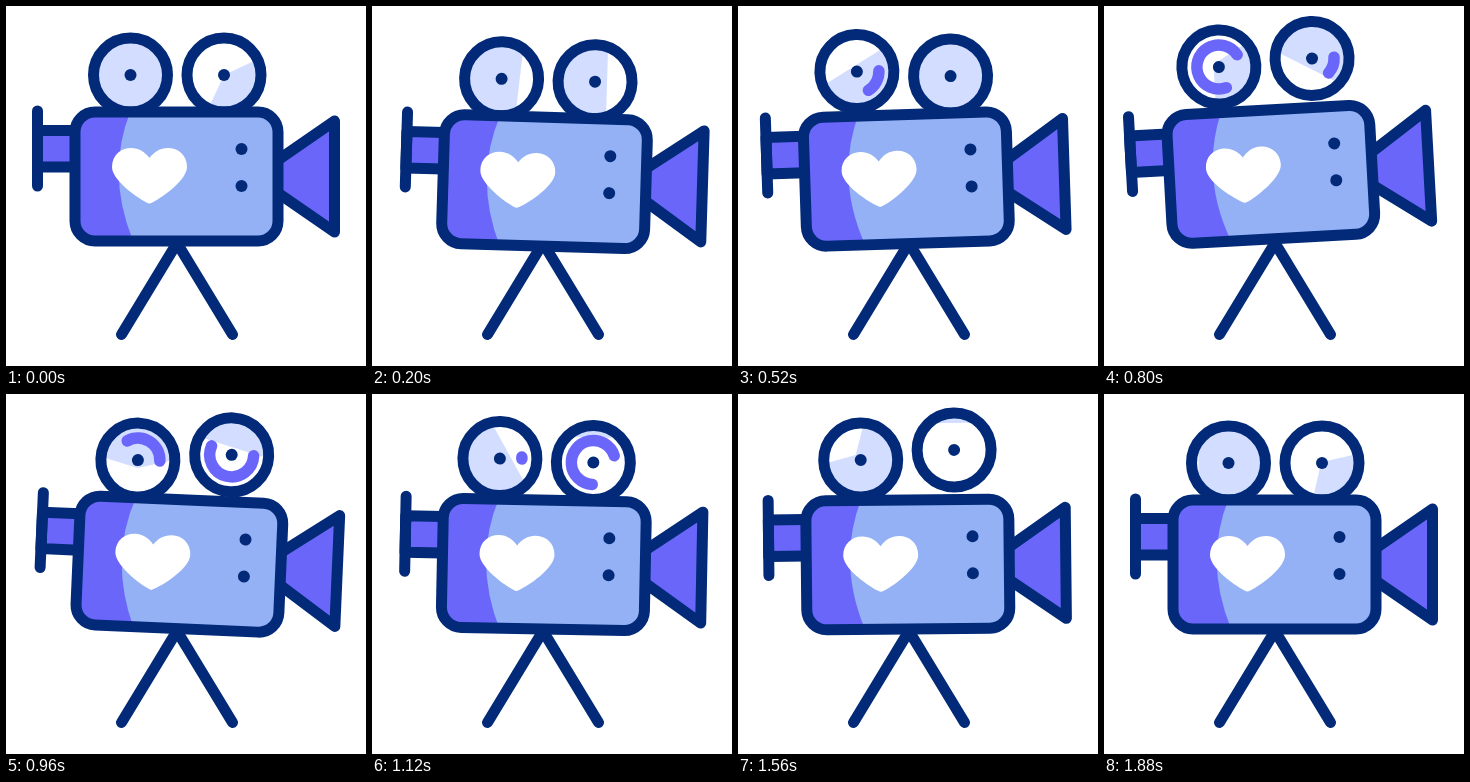
An HTML page for the animation above (2.68 s loop, 360 px wide and 360 px high).

```html
<!DOCTYPE html>
<html lang="en">
<head>
<meta charset="utf-8">
<title>Film camera</title>
<style>
  html, body { margin: 0; width: 100%; height: 100%; overflow: hidden; background: #fff; }
  svg { display: block; width: 100vw; height: 100vh; }
  .line { fill: none; stroke: #022a78; stroke-width: 11; stroke-linecap: round; stroke-linejoin: round; }
  .ink { fill: #022a78; }
  .violet { fill: #6b66fa; }
  .blue { fill: #93b1f4; }
  .pale { fill: #d2ddff; }
  .white { fill: #fff; }
  .arc { fill: none; stroke: #6b66fa; stroke-width: 11.5; stroke-linecap: round; }
</style>
</head>
<body>
<svg viewBox="0 0 360 360">
  <defs>
    <clipPath id="disc"><circle r="34"/></clipPath>
    <clipPath id="box"><rect x="69" y="106" width="203" height="129" rx="20"/></clipPath>
    <g id="hub"><circle class="line" r="37"/><circle class="ink" r="6"/></g>
  </defs>
  <path class="line" d="M115.5 328.5 171 237 226.5 328.5"/>
  <g id="camera">
    <g class="reel">
      <circle class="pale" r="36"/>
      <g clip-path="url(#disc)"><path class="white shine"/></g>
      <path class="arc"/><use href="#hub"/>
    </g>
    <g class="reel">
      <circle class="pale" r="36"/>
      <g clip-path="url(#disc)"><path class="white shine"/></g>
      <path class="arc"/><use href="#hub"/>
    </g>
    <g class="line">
      <path class="violet" d="M69 124.5H31.5V161H69"/>
      <path d="M31.5 105V180"/>
      <path class="violet" d="M272 154 328.5 115V226L272 187"/>
    </g>
    <g clip-path="url(#box)">
      <rect class="violet" x="69" y="106" width="203" height="129"/>
      <path class="blue" d="M124.5 105Q99.5 168 127.5 236H273V105Z"/>
    </g>
    <rect class="line" x="69" y="106" width="203" height="129" rx="20"/>
    <path class="white" d="M143.5 197.5C139 197 106 176 106 161C106 149 115 142 125 142C133 142 139 146 143.5 152C148 146 154 142 162 142C172 142 181 149 181 161C181 176 148 197 143.5 197.5Z"/>
    <circle class="ink" cx="235.5" cy="143" r="6"/>
    <circle class="ink" cx="235.5" cy="180" r="6"/>
  </g>
</svg>
<script>
const LOOP = 2680, MOVING = 1880, STEP = 40, BEAT = 335;

const camera = document.getElementById('camera');
const ease = x => { x = Math.min(1, Math.max(0, x)); return x * x * (3 - 2 * x); };
const linear = x => x;

// keys: [time, value, value...]
function sample(keys, t, curve = ease) {
  const n = keys.findIndex(k => k[0] > t);
  if (n < 0) return keys[keys.length - 1].slice(1);
  const a = keys[n - 1], b = keys[n];
  const p = curve((t - a[0]) / (b[0] - a[0]));
  return a.slice(1).map((v, i) => v + (b[i + 1] - v) * p);
}

const tilt = [[0, 0], [345, 2.8], [680, -5.9], [1002, 2.9], [1340, -3.4], [1640, 0]];
const drop = [[0, 0], [335, 8], [700, -2.8], [1040, 0]];

// shine keys: time, direction, apex distance, half angle
const reels = [
  { x: 124.5, hop: 335, spin: 390, shine: [
    [0, 0, 32, 90], [200, 5, 18, 90], [520, -120, 6, 90], [800, -150, 6, 120],
    [1120, -390, 10, 90], [1560, -495, 7, 60], [1880, -540, 30, 90]] },
  { x: 218, hop: 520, spin: 690, shine: [
    [0, -135, 0, 110], [200, 0, 12, 90], [520, 0, 32, 90], [800, 120, 10, 90],
    [1120, 90, -25, 90], [1560, 90, -27, 90], [1880, 225, 1, 122]] }
];
document.querySelectorAll('.reel').forEach((node, i) => {
  reels[i].node = node;
  reels[i].shinePath = node.querySelector('.shine');
  reels[i].arcPath = node.querySelector('.arc');
});

const polar = (r, deg) => [r * Math.cos(deg * Math.PI / 180), r * Math.sin(deg * Math.PI / 180)];

function wedge([dir, dist, half]) {
  const apex = polar(dist, dir);
  const ray = turn => polar(150, dir + turn).map((v, i) => v + apex[i]);
  return 'M' + [apex, ...[-1, -.5, 0, .5, 1].map(k => ray(k * half))].join('L') + 'Z';
}

function arc(from, to) {
  if (to - from < 1) return '';
  const end = Math.min(to, from + 359.9);
  return `M${polar(22, from)}A22 22 0 ${end - from > 180 ? 1 : 0} 1 ${polar(22, end)}`;
}

// two equal hops, each one beat up and one beat down
function hopHeight(t) {
  if (t <= 0 || t >= 4 * BEAT) return 0;
  const phase = t % (2 * BEAT) / BEAT;
  return 13 * ease(phase < 1 ? phase : 2 - phase);
}

function draw(t) {
  camera.setAttribute('transform',
    `translate(0 ${sample(drop, t)[0]}) rotate(${sample(tilt, t)[0]} 171 237)`);
  for (const r of reels) {
    r.node.setAttribute('transform', `translate(${r.x} ${69 - hopHeight(t - r.hop)})`);
    r.shinePath.setAttribute('d', wedge(sample(r.shine, t, linear)));
    const head = 360 * ease((t - r.spin) / 500);
    const tail = 360 * ease((t - r.spin - 265) / 500);
    r.arcPath.setAttribute('d', arc(tail, head));
  }
}

const start = performance.now();
function frame() {
  const t = (performance.now() - start) % LOOP;
  draw(Math.min(MOVING, Math.floor(t / STEP) * STEP));
  requestAnimationFrame(frame);
}
frame();
</script>
</body>
</html>
```
